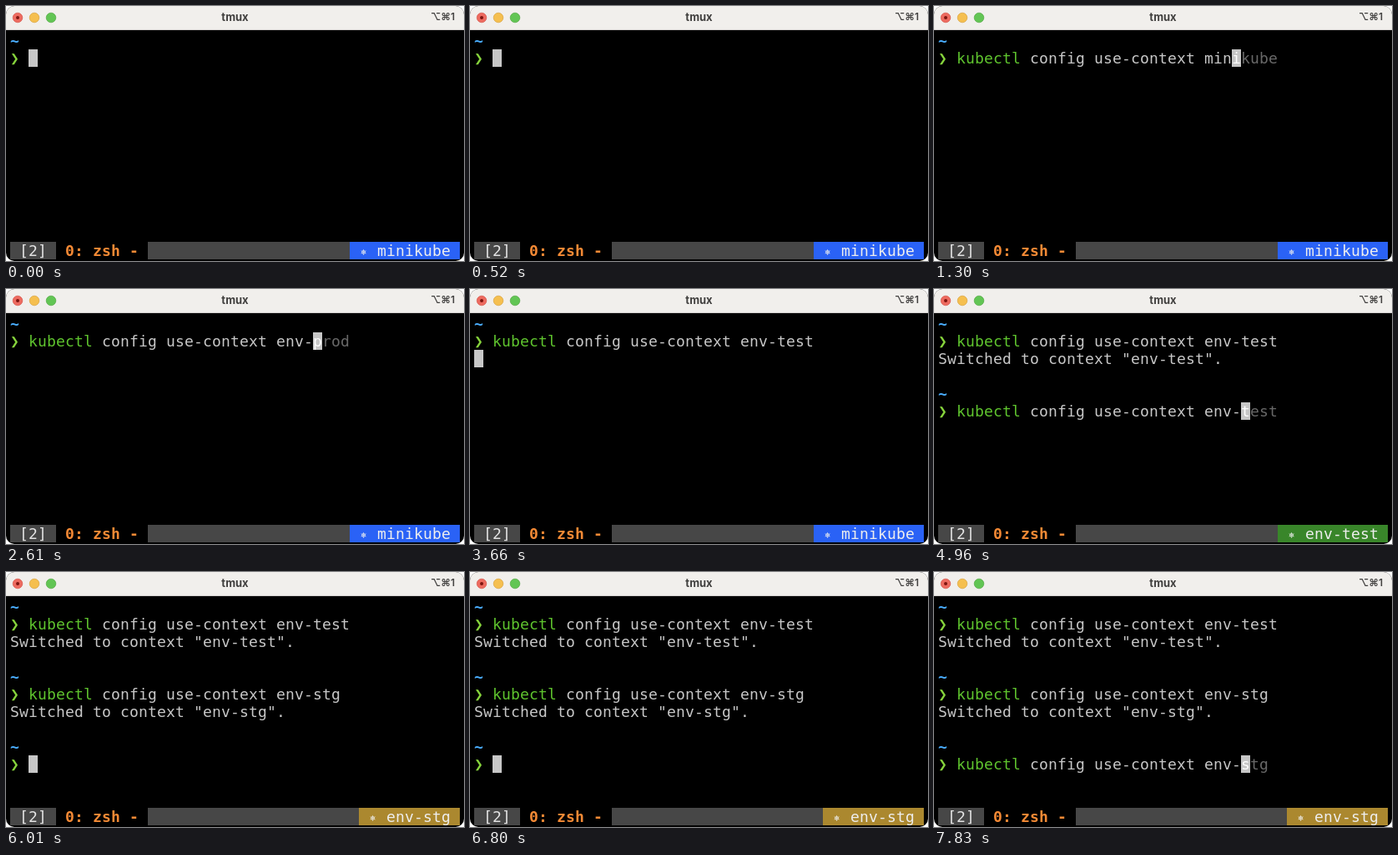
Write an HTML page with a canvas that moves like this. It is 549x306 px and loops after 8000 ms.

```html
<!DOCTYPE html>
<html lang="en">
<head>
<meta charset="utf-8">
<title>tmux</title>
<style>
html, body { margin: 0; width: 100%; height: 100%; overflow: hidden; background: #fff; }
canvas { display: block; width: 549px; height: 306px; }
</style>
</head>
<body>
<canvas id="stage"></canvas>
<script>
const W = 549, H = 306, LOOP = 8000;
const CELL = 11, LINE = 21, LEFT = 5, TOP = 31;
const MONO = '"DejaVu Sans Mono", monospace';
const SANS = 'Inter, "DejaVu Sans", sans-serif';
const TEXT = '#c7c7c7', GREEN = '#5fc42e', DIM = '#686868', BAR = '#474747';
const COMMAND = 'kubectl config use-context ';
const CONTEXT_COLORS = { 'minikube': '#2a62f6', 'env-test': '#39862a', 'env-stg': '#ab882f' };

// [start ms, completed contexts, typed argument (null = empty prompt), suggestion, running]
const STEPS = [
  [0, [], null],
  [780, [], 'minikube'],
  [1040, [], 'miniku', 'be'],
  [1300, [], 'min', 'ikube'],
  [1560, [], '', 'minikube'],
  [1820, [], 'e', 'nv-prod'],
  [2080, [], 'en', 'v-prod'],
  [2350, [], 'env', '-prod'],
  [2610, [], 'env-', 'prod'],
  [2870, [], 'env-t', 'est'],
  [3130, [], 'env-tes', 't'],
  [3400, [], 'env-test'],
  [3660, [], 'env-test', '', true],
  [3920, ['env-test'], null],
  [4430, ['env-test'], 'env-test'],
  [4690, ['env-test'], 'env-tes', 't'],
  [4960, ['env-test'], 'env-', 'test'],
  [5240, ['env-test'], 'env-s', 'tg'],
  [5490, ['env-test'], 'env-stg'],
  [5750, ['env-test'], 'env-stg', '', true],
  [6010, ['env-test', 'env-stg'], null],
  [7060, ['env-test', 'env-stg'], 'env-stg'],
  [7320, ['env-test', 'env-stg'], 'env-st', 'g'],
  [7580, ['env-test', 'env-stg'], 'env-s', 'tg'],
  [7830, ['env-test', 'env-stg'], 'env-', 'stg']
];

const canvas = document.getElementById('stage');
const ctx = canvas.getContext('2d');
const dpr = window.devicePixelRatio || 1;
canvas.width = W * dpr;
canvas.height = H * dpr;
ctx.scale(dpr, dpr);

const colX = col => LEFT + col * CELL;
const rowY = row => TOP + row * LINE;

function put(str, col, row, color, weight = '') {
  ctx.font = `${weight} 18px ${MONO}`;
  ctx.fillStyle = color;
  ctx.textAlign = 'left';
  [...str].forEach((ch, i) => ctx.fillText(ch, colX(col + i), rowY(row) + 17));
}

function fillCells(col, row, count, color) {
  ctx.fillStyle = color;
  ctx.fillRect(colX(col), rowY(row), count * CELL, LINE);
}

function disc(x, y, r, color, edge) {
  ctx.beginPath();
  ctx.arc(x, y, r, 0, Math.PI * 2);
  ctx.fillStyle = color;
  ctx.fill();
  if (edge) {
    ctx.strokeStyle = edge;
    ctx.lineWidth = 0.7;
    ctx.stroke();
  }
}

function drawTitleBar() {
  ctx.fillStyle = '#f1efec';
  ctx.fillRect(0, 0, W, 28);
  ctx.fillStyle = '#d2d0ce';
  ctx.fillRect(0, 28, W, 1);
  disc(14, 14, 5.8, '#ed6a5f', '#d6564b');
  disc(14, 14, 2, '#7d1510');
  disc(34, 14, 5.8, '#f5bf4f', '#d9a23d');
  disc(54, 14, 5.8, '#62c554', '#52a842');
  ctx.fillStyle = '#403f3e';
  ctx.font = `700 13px ${SANS}`;
  ctx.textAlign = 'center';
  ctx.fillText('tmux', 274.5, 18);
  ctx.font = `600 12px ${SANS}`;
  ctx.textAlign = 'right';
  ctx.fillText('⌥⌘1', 538, 17);
}

function drawPrompt(row) {
  put('~', 0, row, '#4aaeff', 'bold');
  put('❯', 0, row + 1, '#86d33c');
}

function drawCommand(row, arg) {
  put('kubectl', 2, row, GREEN);
  put(COMMAND.slice(8) + arg, 10, row, TEXT);
}

function drawStatus(context) {
  const row = 12, width = context.length + 4, col = 49 - width;
  fillCells(0, row, 49, BAR);
  fillCells(5, row, 10, '#000');
  put('[2]', 1, row, '#e4e4e4');
  put('0: zsh -', 6, row, '#f58a35', 'bold');
  fillCells(col, row, width, CONTEXT_COLORS[context]);
  put(context, col + 3, row, '#eee');
  ctx.font = `12px "DejaVu Sans", ${MONO}`;
  ctx.textAlign = 'center';
  ctx.fillText('⎈', colX(col + 1) + 5.5, rowY(row) + 15.5);
}

function drawTerminal([, done, arg, hint = '', running]) {
  done.forEach((name, i) => {
    drawPrompt(i * 4);
    drawCommand(i * 4 + 1, name);
    put(`Switched to context "${name}".`, 0, i * 4 + 2, TEXT);
  });

  const top = done.length * 4;
  let col = 2, row = top + 1;
  drawPrompt(top);
  if (arg !== null) {
    drawCommand(row, arg);
    col += COMMAND.length + arg.length;
    put(hint.slice(1), col + 1, row, DIM);
  }
  if (running) {
    col = 0;
    row++;
  }
  fillCells(col, row, 1, TEXT);
  put(hint.slice(0, 1), col, row, '#fff');
  drawStatus(done[done.length - 1] || 'minikube');
}

function render(time) {
  const t = time % LOOP;
  const step = STEPS.filter(s => s[0] <= t).pop();
  ctx.clearRect(0, 0, W, H);
  ctx.save();
  ctx.beginPath();
  ctx.roundRect(0, 0, W, H, 10);
  ctx.clip();
  ctx.fillStyle = '#000';
  ctx.fillRect(0, 0, W, H);
  drawTitleBar();
  drawTerminal(step);
  ctx.restore();
}

const start = performance.now();
function tick() {
  render(performance.now() - start);
  requestAnimationFrame(tick);
}
tick();
</script>
</body>
</html>
```
